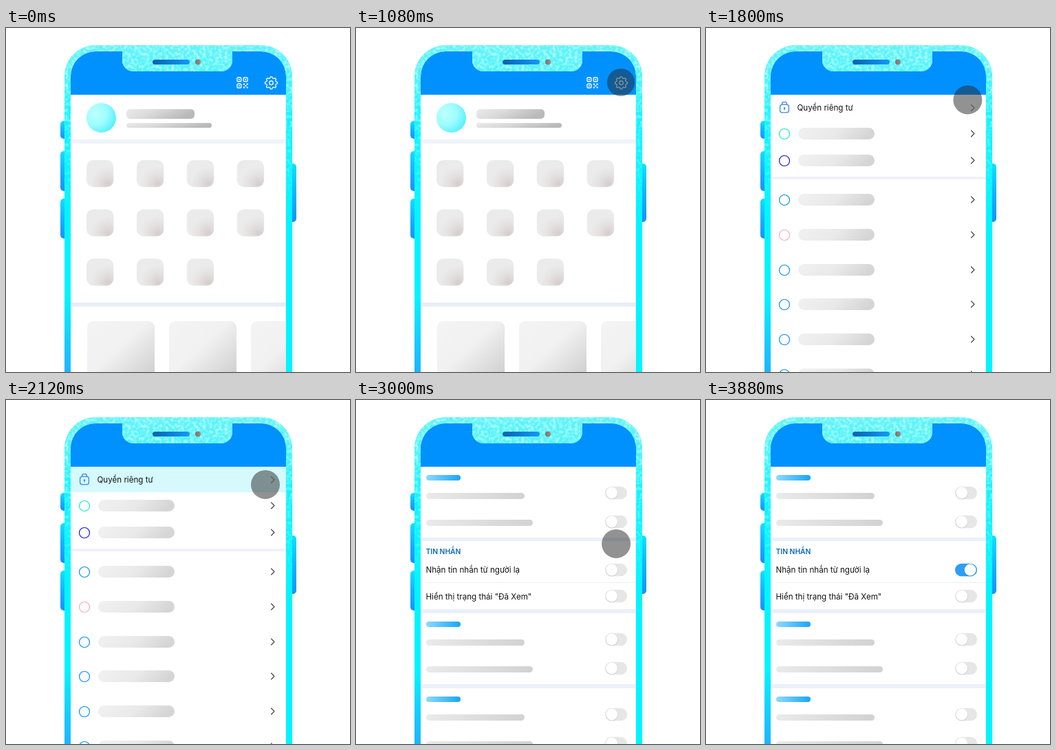
Animation of 500 by 500 pixels, one loop 4800 ms. Source, as an HTML page:

```html
<!DOCTYPE html>
<html lang="vi">
<head>
<meta charset="utf-8">
<style>
html, body { margin: 0; width: 100%; height: 100%; overflow: hidden; background: #fff; }
svg { display: block; width: 100vw; height: 100vh; }
text { font-family: Inter, Roboto, sans-serif; font-size: 11.6px; fill: #111; }
.head { font-size: 10.3px; font-weight: 600; fill: #0a68b4; }
</style>
</head>
<body>
<svg id="stage" viewBox="0 0 500 500">
  <defs>
    <linearGradient id="body" gradientUnits="userSpaceOnUse" x1="0" y1="25" x2="0" y2="300">
      <stop offset="0" stop-color="#62f3fa"/><stop offset=".16" stop-color="#4cf3fb"/>
      <stop offset=".4" stop-color="#0ff5ff"/><stop offset="1" stop-color="#00f5ff"/>
    </linearGradient>
    <linearGradient id="corner" gradientUnits="userSpaceOnUse" x1="0" y1="390" x2="0" y2="500">
      <stop offset="0" stop-color="#1fb4ff" stop-opacity="0"/><stop offset="1" stop-color="#1fb4ff"/>
    </linearGradient>
    <linearGradient id="key" x2="0" y2="1">
      <stop offset="0" stop-color="#0fe0ff"/><stop offset=".5" stop-color="#12b4ff"/><stop offset="1" stop-color="#1a90fa"/>
    </linearGradient>
    <linearGradient id="speaker">
      <stop offset="0" stop-color="#0763ad"/><stop offset="1" stop-color="#1497fb"/>
    </linearGradient>
    <linearGradient id="camera"><stop offset="0" stop-color="#747474"/><stop offset="1" stop-color="#a58a80"/></linearGradient>
    <radialGradient id="avatar" cx=".3" cy=".35" r=".8">
      <stop offset="0" stop-color="#beffff"/><stop offset=".5" stop-color="#9dfcff"/><stop offset="1" stop-color="#4beeff"/>
    </radialGradient>
    <linearGradient id="name" x2="1" y2=".3">
      <stop offset="0" stop-color="#ebebeb"/><stop offset=".45" stop-color="#dadada"/><stop offset="1" stop-color="#b9b9b9"/>
    </linearGradient>
    <radialGradient id="tile" cx=".8" cy=".9" r=".65">
      <stop offset="0" stop-color="#d6cdcd"/><stop offset=".5" stop-color="#e3dfdf"/><stop offset="1" stop-color="#ebebeb"/>
    </radialGradient>
    <linearGradient id="card" x2="1" y2="1">
      <stop offset="0" stop-color="#f4f4f4"/><stop offset=".45" stop-color="#f1f1f1"/><stop offset="1" stop-color="#cacaca"/>
    </linearGradient>
    <linearGradient id="row" x2="1" y2=".15">
      <stop offset="0" stop-color="#f1f1f1"/><stop offset=".55" stop-color="#e9e9e9"/><stop offset="1" stop-color="#d5d5d5"/>
    </linearGradient>
    <linearGradient id="line"><stop offset="0" stop-color="#eaeaea"/><stop offset="1" stop-color="#d2d2d2"/></linearGradient>
    <linearGradient id="pill"><stop offset="0" stop-color="#8ed9ff"/><stop offset="1" stop-color="#18a6f8"/></linearGradient>
    <linearGradient id="fade" gradientUnits="userSpaceOnUse" x1="0" y1="60" x2="0" y2="270">
      <stop offset="0" stop-color="#fff"/><stop offset="1" stop-color="#000"/>
    </linearGradient>
    <mask id="topmask"><rect width="500" height="500" fill="url(#fade)"/></mask>
    <filter id="grain" x="0" y="0" width="1" height="1" color-interpolation-filters="sRGB">
      <feTurbulence type="fractalNoise" baseFrequency=".22" numOctaves="2" seed="4"/>
      <feColorMatrix values="0 0 0 0 .72  0 0 0 0 1  0 0 0 0 .98  2.6 0 0 0 -1.05"/>
    </filter>
    <clipPath id="screen"><path id="screenShape"/></clipPath>
    <clipPath id="frameClip"><path id="frameShape" clip-rule="evenodd"/></clipPath>
  </defs>
  <g id="keys" fill="url(#key)"></g>
  <g clip-path="url(#screen)">
    <rect x="94" y="34" width="313" height="466" fill="#fff"/>
    <rect x="94" y="34" width="313" height="63" fill="#0091ff"/>
    <g id="home"></g>
    <g id="settings"></g>
    <g id="privacy"></g>
  </g>
  <path id="frame" fill="url(#body)" fill-rule="evenodd"/>
  <rect x="85" y="390" width="9" height="110" fill="url(#corner)"/>
  <g clip-path="url(#frameClip)"><g mask="url(#topmask)">
    <rect x="85" y="25" width="331" height="250" filter="url(#grain)"/>
  </g></g>
  <rect x="213" y="46" width="54" height="7" rx="3.5" fill="url(#speaker)"/>
  <circle cx="279" cy="49.5" r="4" fill="url(#camera)"/>
  <circle id="touch" fill="#262626"/>
</svg>
<script>
const $ = id => document.getElementById(id);
const LOOP = 4800, STEP = 40;

// ---- drawing helpers ----
const rect = (x, y, w, h, r, fill, more = '') =>
  `<rect x="${x}" y="${y}" width="${w}" height="${h}" rx="${r}" fill="${fill}" ${more}/>`;
const ring = (x, y, r, color, w = 1.2) =>
  `<circle cx="${x}" cy="${y}" r="${r}" fill="none" stroke="${color}" stroke-width="${w}"/>`;
const stroke = (d, color, w) =>
  `<path d="${d}" fill="none" stroke="${color}" stroke-width="${w}" stroke-linecap="round" stroke-linejoin="round"/>`;
const label = (x, y, s, cls = '') => `<text x="${x}" y="${y}" class="${cls}">${s}</text>`;
const band = (y, h, fill = '#ebf0f9') => rect(94, y, 313, h, 0, fill);
const sheet = band(97, 403, '#fff') + band(34, 63, '#0091ff');

function buildPhone() {
  const outer = 'M85 520V70A45 45 0 0 1 130 25H371A45 45 0 0 1 416 70V520Z';
  const inner = 'M94 520V70A36 36 0 0 1 130 34H169V47A16 16 0 0 0 185 63H313A16 16 0 0 0 329 47V34H371A36 36 0 0 1 407 70V520Z';
  $('screenShape').setAttribute('d', inner);
  $('frameShape').setAttribute('d', outer + inner);
  $('frame').setAttribute('d', outer + inner);
  $('keys').innerHTML = [[79, 135, 26], [79, 179, 58], [79, 248, 58], [408, 197, 85]]
    .map(([x, y, h]) => `<rect x="${x}" y="${y}" width="14" height="${h}" rx="5"/>`).join('');
}

function gear(cx, cy) {
  let d = '';
  for (let i = 0; i < 96; i++) {
    const a = i / 96 * Math.PI * 2;
    const r = 8 + Math.max(-1, Math.min(1, 1.5 * Math.cos(8 * a)));
    d += (i ? 'L' : 'M') + (cx + r * Math.cos(a)).toFixed(2) + ' ' + (cy + r * Math.sin(a)).toFixed(2);
  }
  return stroke(d + 'Z', '#fff', 1.3) + ring(cx, cy, 2.8, '#fff', 1.3);
}

function scanIcon() {
  let s = '';
  for (const [x, y] of [[336, 72], [345.2, 72], [336, 81.2]])
    s += rect(x, y, 5.8, 5.8, 1.2, 'none', 'stroke="#fff" stroke-width="1.4"') + rect(x + 2, y + 2, 1.8, 1.8, 0, '#fff');
  for (const [x, y] of [[0, 0], [2, 0], [1, 1], [0, 2], [2, 2]])
    s += rect(344.8 + x * 2.4, 80.6 + y * 2.4, 2.2, 2.2, 0.4, '#fff');
  return s;
}

function buildHome() {
  let s = scanIcon() + gear(385.5, 79.8);
  s += '<circle cx="138.5" cy="130.5" r="21.5" fill="url(#avatar)"/>';
  s += rect(175, 118, 99, 14, 5, 'url(#name)') + rect(175, 138, 124, 7, 3.5, 'url(#name)');
  s += band(162, 6, '#eff4fa') + band(399, 6, '#e8eef8');
  for (let i = 0; i < 11; i++)
    s += rect(117 + i % 4 * 72.9, 192 + Math.floor(i / 4) * 71.6, 39.4, 39.2, 10, 'url(#tile)');
  for (let i = 0; i < 3; i++) s += rect(118 + i * 119, 426, 98, 90, 9, 'url(#card)');
  return s;
}

function buildSettings() {
  const blue = '#0a8cf5', lock = '#3a86f0';
  const rows = [[154, '#14ecc6'], [193, '#1410d4'], [250, blue], [301, '#f7a6c4'],
    [352, blue], [402, blue], [453, blue], [504, blue]];
  const chevron = (y, c) => stroke(`M385.5 ${y - 4.5}L390 ${y}L385.5 ${y + 4.5}`, c, 1.1);
  let s = sheet + `<g id="hot">${band(97, 37, '#d5f9fc')}</g>`;
  s += rect(107.6, 111.4, 12.8, 11.4, 3, 'none', `stroke="${lock}" stroke-width="1.3"`);
  s += stroke('M110.6 111V110A2.4 2.4 0 0 1 113 107.6H115A2.4 2.4 0 0 1 117.4 110V111', lock, 1.3);
  s += `<circle cx="114" cy="116.6" r="1.3" fill="${lock}"/>` + stroke('M114 117V119', lock, 1.2);
  s += label(132.5, 120.3, 'Quyền riêng tư') + chevron(116, '#8f8f8f');
  for (const [y, c] of rows)
    s += ring(114, y, 7.5, c) + rect(134, y - 9, 111, 17, 8.5, 'url(#row)') + chevron(y - 0.5, '#444');
  return s + band(216, 4, '#eff2f9');
}

function buildPrivacy() {
  const toggle = (y, id = '') =>
    rect(362, y - 9.3, 32, 18.6, 9.3, '#e6e6e6', id && `id="${id}Track"`) +
    `<g ${id && `id="${id}Knob"`}><circle cx="371.7" cy="${y + 0.6}" r="9" fill="#000" opacity=".1"/>` +
    `<circle cx="371.7" cy="${y}" r="8.4" fill="#fff"/></g>`;
  let s = sheet;
  for (const y of [113, 326, 435]) {
    s += rect(102, y - 4, 50, 8, 4, 'url(#pill)');
    s += rect(102, y + 22, 143, 9, 4.5, 'url(#line)') + rect(102, y + 61, 155, 9, 4.5, 'url(#line)');
    s += toggle(y + 22) + toggle(y + 64);
  }
  s += band(200, 5) + band(304, 6) + band(413, 6);
  s += rect(102, 265, 305, 1, 0, '#efefef');
  s += label(101.5, 223.6, 'TIN NHẮN', 'head');
  s += label(101.5, 251, 'Nhận tin nhắn từ người lạ');
  s += label(101.5, 289.5, 'Hiển thị trạng thái "Đã Xem"');
  return s + toggle(247, 'main') + toggle(285);
}

// ---- motion ----
const ramp = (t, a, b) => Math.max(0, Math.min(1, (t - a) / (b - a)));
const mix = (a, b, p) => a + (b - a) * p;
const smooth = p => p * p * (3 - 2 * p);

function glide(p) {
  let lo = 0, hi = 1;
  for (let i = 0; i < 20; i++) {
    const u = (lo + hi) / 2, v = 1 - u;
    if (0.5 * v * v * u + 2 * v * u * u + u * u * u < p) lo = u; else hi = u;
  }
  const v = 1 - lo;
  return 0.5 * v * v * lo + 3 * v * lo * lo + lo * lo * lo;
}

function touchAt(t) {
  const enter = 1 - Math.pow(1 - ramp(t, 110, 835), 3.05);
  const toRow = glide(ramp(t, 1530, 2130));
  const toSwitch = glide(ramp(t, 2612, 3312));
  const tap = Math.sin(Math.PI * ramp(t, 1060, 1320)) + Math.sin(Math.PI * ramp(t, 3420, 3720));
  return {
    x: mix(366, 385, enter) - 8 * toRow + 1.6 * toSwitch,
    y: mix(211, 79, enter) + 44 * toRow + 123 * toSwitch,
    r: 21 - 4 * tap - ramp(t, 3600, 3720),
    a: 0.5 * ramp(t, 110, 610) * (1 - ramp(t, 3720, 3880))
  };
}

function show(id, a) {
  $(id).style.opacity = a;
  $(id).style.display = a > 0 ? '' : 'none';
}

function draw(t) {
  show('settings', ramp(t, 1160, 1320));
  show('privacy', ramp(t, 2240, 2400));
  show('hot', ramp(t, 1840, 2120));

  const on = smooth(ramp(t, 3440, 3680));
  const shade = [[230, 43], [230, 158], [230, 247]].map(([a, b]) => Math.round(mix(a, b, on)));
  $('mainTrack').setAttribute('fill', `rgb(${shade})`);
  $('mainKnob').setAttribute('transform', `translate(${12.4 * on} 0)`);

  const { x, y, r, a } = touchAt(t), touch = $('touch');
  touch.setAttribute('cx', x);
  touch.setAttribute('cy', y);
  touch.setAttribute('r', r);
  touch.setAttribute('opacity', a);
}

buildPhone();
$('home').innerHTML = buildHome();
$('settings').innerHTML = buildSettings();
$('privacy').innerHTML = buildPrivacy();

const start = performance.now();
function tick() {
  const t = (performance.now() - start) % LOOP;
  draw(Math.floor(t / STEP) * STEP);
  requestAnimationFrame(tick);
}
tick();
</script>
</body>
</html>
```
